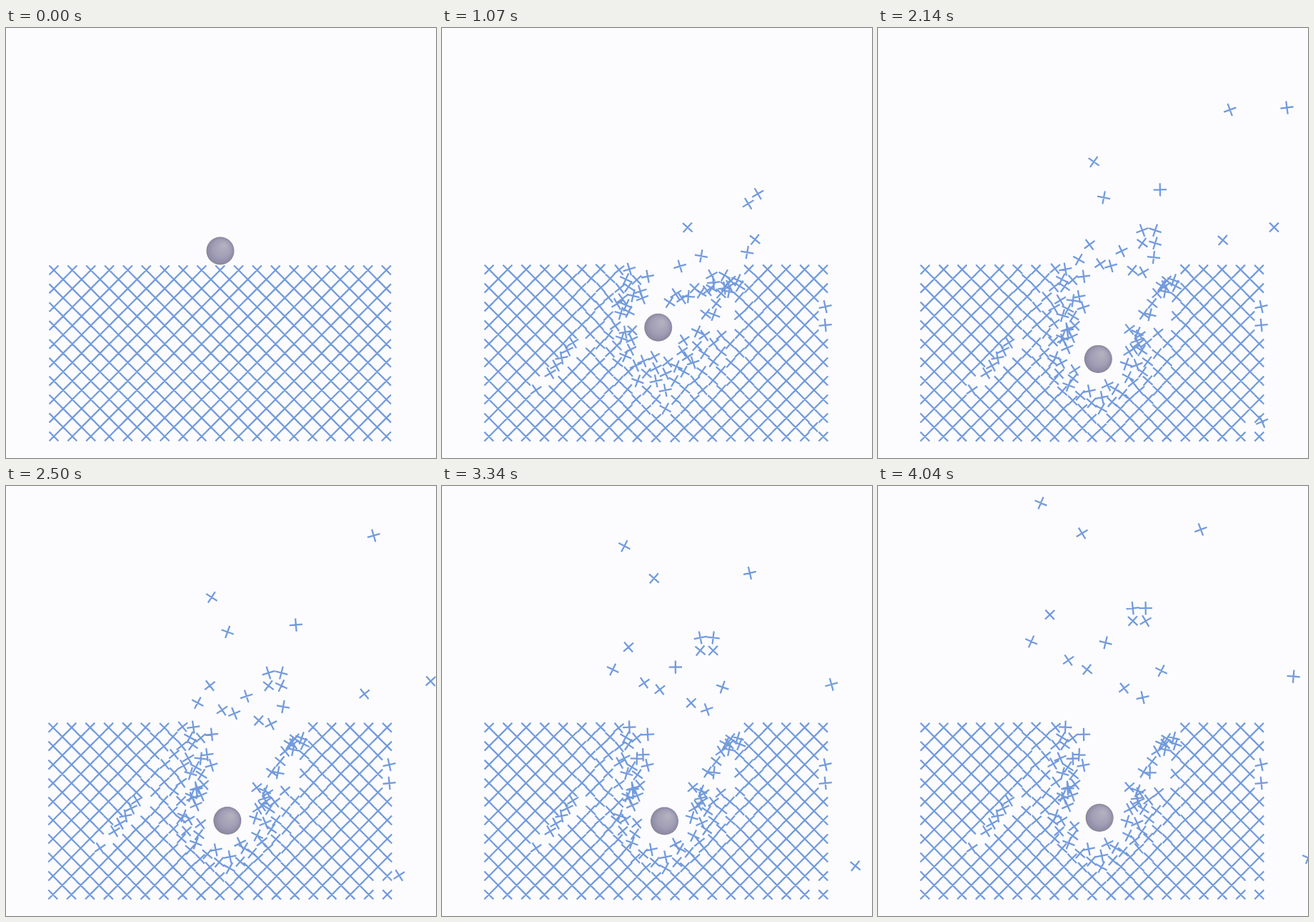
Recreate the animation shown at these times as an HTML page with a canvas. Size 602 by 602 pixels, loop 4.08 s.

```html
<!DOCTYPE html>
<html lang="en">
<head>
<meta charset="utf-8">
<title>Ball striking a lattice</title>
<style>
  html, body { margin: 0; width: 100%; height: 100%; overflow: hidden; background: #fcfcfe; }
  canvas { display: block; }
</style>
</head>
<body>
<canvas id="stage" width="602" height="602"></canvas>
<script>
const ctx = document.getElementById('stage').getContext('2d');
const LOOP = 4080, STEP = 33.37;
const GAP = 12.93, ARM = 9.15;
const RADIUS = 19.5, CLEAR = 27, REACH = 70, AXIS = 303;

let seed = 11;
const rnd = () => (seed = (seed * 16807) % 2147483647) / 2147483647;
const clamp = v => Math.max(0, Math.min(1, v));
const mix = (a, b, k) => a + (b - a) * k;
const smooth = v => { const k = clamp(v); return k * k * (3 - 2 * k); };

// Sides of the broken zone and of the empty cavity inside it
const zoneLeft = y => 252 + 0.9 * Math.max(0, y - 480);
const zoneRight = y => 425 - 0.55 * (y - 339);
const cavityLeft = y => zoneLeft(y) + 31;
const cavityRight = y => Math.max(AXIS + 22, zoneRight(y) - 25);

const nodes = [];
for (let row = 0; row < 19; row++) {
  for (let col = row % 2; col < 37; col += 2) {
    const x = 67 + GAP * col, y = 339 + GAP * row;
    const outside = Math.max(0, Math.hypot(x - 312, y - 415) - 70);
    const away = Math.hypot(x - 305, y - 520) || 1;
    nodes.push({
      col, row, x, y,
      delay: Math.min(400, 1.6 * Math.hypot(x - 300, y - 332)),
      loose: x > zoneLeft(y) && x < zoneRight(y),
      shake: 2.2 * Math.exp(-outside / 35),
      swellX: 1.3 * (x - 305) / away, swellY: 1.3 * (y - 520) / away,
      phase: rnd() * 6.28, turn: rnd() - 0.5, spin: rnd() - 0.5,
      strayX: rnd() - 0.5, strayY: rnd() - 0.5
    });
  }
}

// A flight passes (x, y) at 2140 ms with a speed in px/s;
// it takes the free node nearest to its line at the time `from`.
function launch(x, y, vx, vy, from = 300) {
  const at = t => ({ x: x + vx * (t - 2140) / 1000, y: y + vy * (t - 2140) / 1000 });
  const p = at(from);
  const far = n => n.flight ? Infinity : Math.hypot(n.x - p.x, n.y - p.y);
  nodes.reduce((a, b) => far(b) < far(a) ? b : a).flight = { at, from };
}
launch(493, 114, 60, -123);
launch(573, 111, 122, -113);
launch(483, 297, 52, -16);
launch(555, 279, 109, -16);
launch(302, 187, -39, -86);
launch(316, 237, -16, -90);
launch(395, 226, 30, -87);
launch(538, 551, 34, -16, 1800);
for (let i = 0; i < 4; i++) {
  launch(370 + 18 * (i % 2), 283 + 18 * (i >> 1), -7, -59);
}
for (let i = 0; i < 8; i++) {
  const side = i % 3 === 1 ? -1 : 1;
  launch(281 + 15 * i, 312 + 3 * i + 12 * side, -35 + 5.8 * i, -63 + 5.3 * i + 7 * side);
}

function ballAt(t) {
  const s = t / 1000;
  return {
    x: 300 + 11.5 * Math.sin(Math.PI / 2 * s / 3.3) ** 2,
    y: 312 + s * (137.8 - 38.7 * s + 3.45 * s * s)
  };
}

// Squeezes a loose node out of the cavity, into the wall on its side
function squeeze(n) {
  const l = zoneLeft(n.y), r = zoneRight(n.y);
  const x = n.x < AXIS
    ? l + (n.x - l) * (cavityLeft(n.y) - l) / (AXIS - l)
    : r - (r - n.x) * (r - cavityRight(n.y)) / (r - AXIS);
  return { x: x + 14 * n.strayX, y: n.y + 16 * n.strayY + 4 };
}

// Presses everything near the ball into a shell around it
function press(x, y, ball) {
  const dx = x - ball.x, dy = y - ball.y, d = Math.hypot(dx, dy) || 1;
  if (d >= REACH) return { x, y };
  const push = CLEAR * clamp((ball.y - 312) / 60);
  const k = Math.max(CLEAR, push + d * (1 - push / REACH)) / d;
  return { x: ball.x + dx * k, y: ball.y + dy * k };
}

function pose(n, t, ball) {
  const hit = clamp((t - n.delay) / (670 - n.delay));
  let { x, y } = n, angle = Math.PI / 4;

  if (n.flight) {
    const p = n.flight.at(t), k = smooth((t - n.flight.from + 200) / 570);
    return {
      x: mix(x, p.x, k), y: mix(y, p.y, k),
      angle: angle + k * (n.turn + n.spin * t / 1000)
    };
  }

  const slip = n.col + n.row === 18 && n.row >= 8 && n.row <= 13;
  const chipped = n.col === 36 && n.turn > 0.2;
  if (n.loose) {
    const k = smooth((ball.y + CLEAR - n.y) / 50), p = squeeze(n);
    x = mix(x, p.x, k);
    y = mix(y, p.y, k);
    angle += hit * n.turn * 1.2 + k * n.spin * t / 4000;
  } else if (slip) {
    // Diagonal crack: the pieces bunch up towards its middle
    const i = n.row - 8;
    if (i < 5) {
      x += hit * (5 * i - 13);
      y -= hit * (2 + 2.2 * i);
    }
    angle += hit * (0.35 + 0.5 * n.turn);
  } else {
    const w = t / 400 + n.phase;
    x += hit * (n.swellX + n.shake * Math.sin(w));
    y += hit * (n.swellY + n.shake * Math.cos(w));
    angle += hit * n.turn * (chipped ? 1.5 : 0.25 * n.shake);
    if (chipped) x += hit * 3;
  }
  return { ...press(x, y, ball), angle };
}

function drawBall({ x, y }) {
  const g = ctx.createRadialGradient(x + 6, y - 8, 1, x, y, RADIUS);
  g.addColorStop(0, '#b4b1c0');
  g.addColorStop(0.6, '#a29fb6');
  g.addColorStop(0.92, '#8f8ca6');
  g.addColorStop(1, '#838090');
  ctx.fillStyle = g;
  ctx.beginPath();
  ctx.arc(x, y, RADIUS, 0, Math.PI * 2);
  ctx.fill();
}

function draw(t) {
  const ball = ballAt(t);
  ctx.fillStyle = '#fcfcfe';
  ctx.fillRect(0, 0, 602, 602);
  ctx.strokeStyle = '#739bdc';
  ctx.lineWidth = 2.3;
  ctx.beginPath();
  for (const n of nodes) {
    const { x, y, angle } = pose(n, t, ball);
    const a = Math.cos(angle) * ARM, b = Math.sin(angle) * ARM;
    ctx.moveTo(x - a, y - b);
    ctx.lineTo(x + a, y + b);
    ctx.moveTo(x + b, y - a);
    ctx.lineTo(x - b, y + a);
  }
  ctx.stroke();
  drawBall(ball);
}

const start = performance.now();
function tick() {
  const t = (performance.now() - start) % LOOP;
  draw(Math.min(121, Math.floor((t + 6) / STEP)) * STEP);
  requestAnimationFrame(tick);
}
tick();
</script>
</body>
</html>
```
